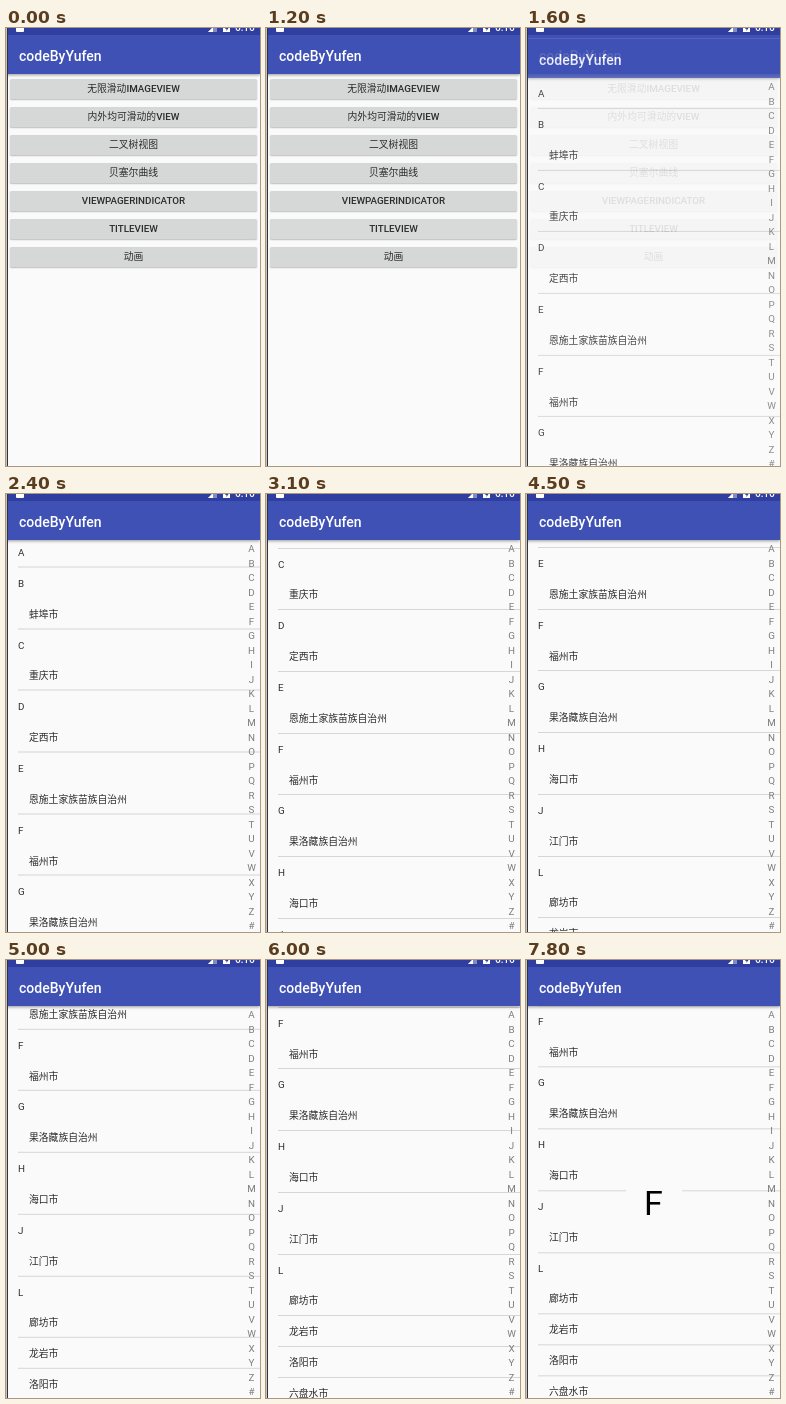
Animation of 254x438 px, one loop 8 s. Source, as an HTML page:

```html
<!DOCTYPE html>
<html lang="zh-CN">
<head>
<meta charset="utf-8">
<style>
html, body { margin: 0; width: 100%; height: 100%; overflow: hidden; }
body { position: relative; background: #fafafa; color: #2b2b2b;
  font: 9.8px Roboto, "Noto Sans CJK SC", "Noto Sans CJK", sans-serif; }
div { position: absolute; box-sizing: border-box; white-space: nowrap; }
#stage { width: 254px; height: 438px; overflow: hidden; }
#edge { left: 0; top: 0; width: 2px; height: 438px; background: #333; border-left: 1px solid #c4c4c8; }
#status { left: 0; top: 0; width: 254px; height: 7px; background: #303f9f; overflow: hidden; color: #fff; }
#status svg { position: absolute; left: 0; top: 0; }
#clock { left: 229px; top: -7px; font-size: 10px; line-height: 14px; font-weight: 500; }
.screen { left: 0; top: 7px; width: 254px; height: 431px; background: #fafafa; overflow: hidden; }
.bar { left: 0; top: 0; width: 254px; height: 39px; background: #3f51b5; color: #fff;
  box-shadow: 0 1px 3px rgba(0,0,0,.4); padding-left: 13px; font: 500 14px/42px Roboto, sans-serif; }
.button { left: 4px; width: 247px; height: 20.5px; border-radius: 1.5px; background: #d6d7d7;
  box-shadow: 0 1px 1.5px rgba(0,0,0,.25); text-align: center; line-height: 20.5px; font-weight: 500; }
#list { left: 0; top: 39.1px; width: 254px; }
.row { left: 12px; width: 242px; height: 30.85px; line-height: 32.4px; }
.city { padding-left: 11px; }
.ruled { border-bottom: 1px solid #d6d6d6; }
.letter { left: 235.5px; width: 20px; height: 14px; line-height: 14px; text-align: center; color: #7c7c7c; }
#popup { left: 100px; top: 209px; width: 56px; height: 56px; background: #fafafa; color: #000;
  text-align: center; text-indent: -1px; font-size: 34px; line-height: 54px; }
</style>
</head>
<body>
<div id="stage">
  <div class="screen" id="menu"><div class="bar">codeByYufen</div></div>
  <div class="screen" id="cities">
    <div id="list"></div>
    <div id="popup"></div>
    <div class="bar">codeByYufen</div>
  </div>
  <div id="status">
    <svg width="254" height="7" fill="#fff">
      <rect x="10" y="-4" width="8" height="8" rx="1"/>
      <path d="M202 4L211-5V4Z" opacity=".4"/>
      <path d="M202 4L207-1V4Z"/>
      <path d="M217-6h7V4h-7Z"/>
      <path d="M221-2l-2 3h1.5v2l2-3h-1.5Z" fill="#303f9f"/>
    </svg>
    <div id="clock">6:16</div>
  </div>
  <div id="edge"></div>
</div>
<script>
const $ = id => document.getElementById(id);
const ROW = 30.85, LOOP = 8000;
const labels = ['无限滑动IMAGEVIEW', '内外均可滑动的VIEW', '二叉树视图', '贝塞尔曲线',
  'VIEWPAGERINDICATOR', 'TITLEVIEW', '动画'];
const rows = ('A B 蚌埠市 C 重庆市 D 定西市 E 恩施土家族苗族自治州 F 福州市 G 果洛藏族自治州 ' +
  'H 海口市 J 江门市 L 廊坊市 龙岩市 洛阳市 六盘水市 M 绵阳市 N 南京市').split(' ');

function add(parent, className, text, top) {
  const el = document.createElement('div');
  el.className = className;
  el.textContent = text;
  el.style.top = top + 'px';
  parent.append(el);
  return el;
}

const buttons = labels.map((text, i) => add($('menu'), 'button', text, 43.6 + 28.05 * i));
rows.forEach((text, i) => {
  const city = text.length > 1;
  add($('list'), 'row' + (city ? ' city' : '') + (city || !i ? ' ruled' : ''), text, i * ROW);
});
[...'ABCDEFGHIJKLMNOPQRSTUVWXYZ#'].forEach((c, i) => add($('cities'), 'letter', c, 41 + 14.5 * i));

// [time, scroll offset] of the two drags and the last nudge
const drags = [[2100, 0], [2400, 3.5], [2700, 38], [3100, 84], [3300, 106], [3500, 118], [3900, 118],
  [4200, 160], [4500, 208], [4800, 245], [5300, 268], [5400, 268], [5700, 276]];

function dragAt(t) {
  const i = drags.findIndex(p => p[0] > t);
  if (i === 0) return 0;
  if (i < 0) return drags.at(-1)[1];
  const [t0, y0] = drags[i - 1], [t1, y1] = drags[i];
  return y0 + (y1 - y0) * (t - t0) / (t1 - t0);
}

// Index letter under the finger
function letterAt(t) {
  if (t < 6800) return '';
  return t < 7800 ? 'DCBABCDE'[Math.min(7, (t - 6800) / 100)] : 'F';
}

function draw(t) {
  buttons[5].style.background = t < 900 ? '#d6d7d7' : t < 1000 ? '#d2d3d3' : t < 1200 ? '#cfd0d0' : '#d8d9d9';

  const enter = Math.max(0, Math.min(1, (t - 1400) / 300));
  $('cities').style.opacity = Math.min(1, enter * 1.3);
  $('cities').style.transform = `translateY(${35 * (1 - enter) ** 2}px)`;

  const letter = letterAt(t);
  const scroll = letter ? rows.indexOf(letter) * ROW : dragAt(t);
  $('list').style.transform = `translateY(${-scroll}px)`;
  $('popup').style.display = letter ? 'block' : 'none';
  $('popup').textContent = letter;
}

const start = performance.now();
function tick() {
  const t = (performance.now() - start) % LOOP;
  draw(Math.floor(t / 100) * 100);
  requestAnimationFrame(tick);
}
tick();
</script>
</body>
</html>
```
